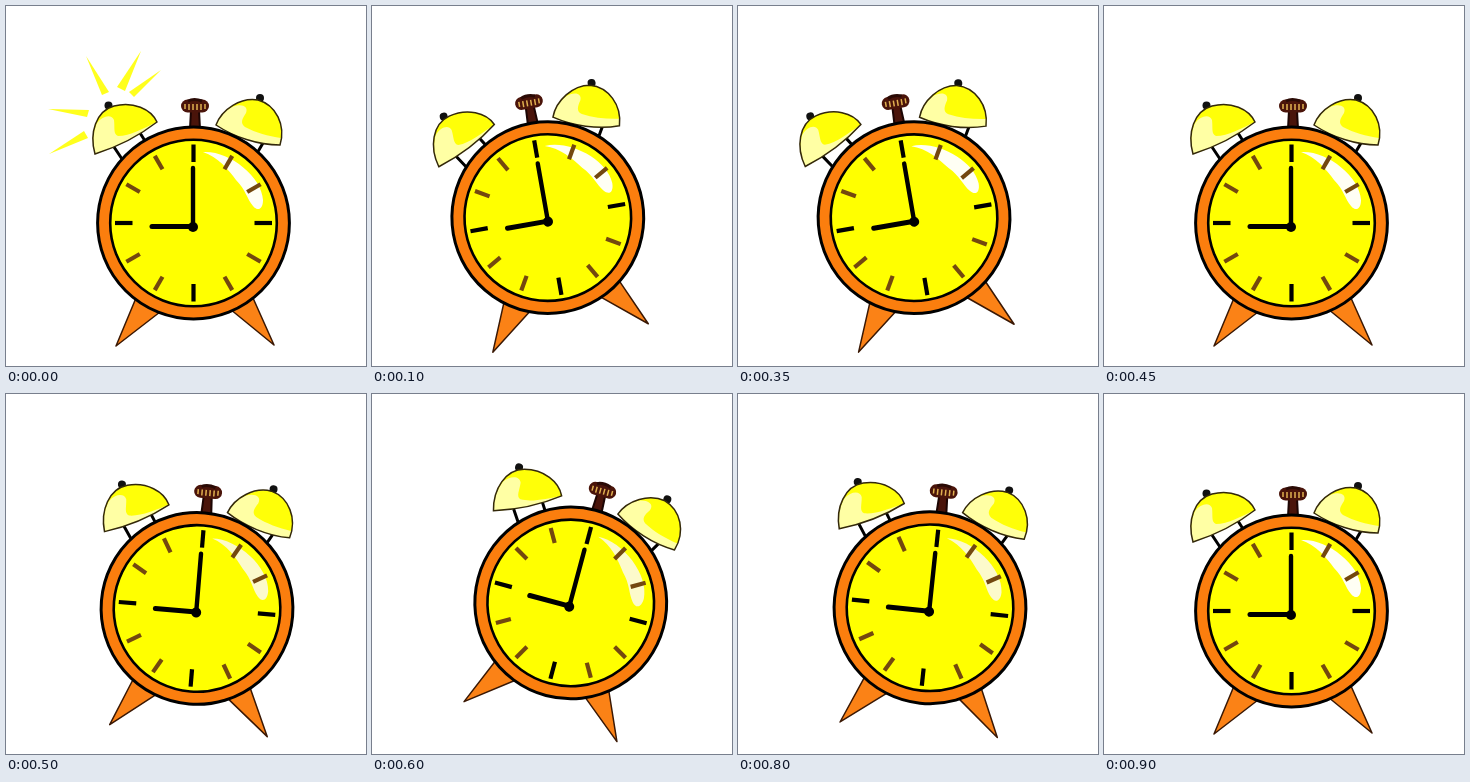
Recreate the animation shown at these times as an HTML page. Size 360 by 360 pixels, loop 950 ms.

```html
<!DOCTYPE html>
<html>
<head>
<meta charset="utf-8">
<title>Alarm clock</title>
<style>
html, body { margin: 0; width: 100%; height: 100%; overflow: hidden; background: #fff; }
/* Laid out at double size and halved in the transform, to stay sharp in perspective */
svg { position: absolute; left: 0; top: 0; width: 720px; height: 720px; overflow: visible; transform-origin: 0 0; }
</style>
</head>
<body>
<svg id="clock" viewBox="0 0 360 360">
  <g id="rays" fill="#ffff1e">
    <path d="M135 45L111 81L119 85Z"/>
    <path d="M80 50L96 89L103 86Z"/>
    <path d="M155 64L123 86L128 91Z"/>
    <path d="M42 103L83 104L81 111Z"/>
    <path d="M43 148L78 125L82 132Z"/>
  </g>
  <g fill="#fb8216" stroke="#3a1804" stroke-width="1.5" stroke-linejoin="round">
    <path d="M110 340L130 292L154 306Z"/>
    <path d="M268 339L247 292L224 303Z"/>
  </g>
  <path d="M108 141L116 153M134 127L141 138M227 125L221 138M257 137L250 149" stroke="#000" stroke-width="3"/>
  <path d="M185 104H193L194 123H184Z" fill="#4a140a" stroke="#1c0503" stroke-width="2"/>
  <rect x="175" y="93.500" width="28" height="13" rx="6.500" fill="#4a140a"/>
  <path d="M182 95Q188 92 196 95" fill="none" stroke="#2a0a05" stroke-width="3"/>
  <path id="grip" d="M179 98V103M183 98V104M187 98V104M191 98V104M195 98V104M199 98V103" stroke="#e0b050" stroke-width="1.500"/>
  <circle cx="102.500" cy="99.500" r="4" fill="#111"/>
  <circle cx="254" cy="92" r="4" fill="#111"/>
  <g fill="#ffff08">
    <path id="bellL" d="M89 148C83 127 90 105 108 100C127 95 145 103 151 116C133 130 111 141 89 148Z"/>
    <path id="bellR" d="M210 119C216 103 235 91 252 94C270 99 280 119 274 139C252 139 228 131 210 119Z"/>
  </g>
  <g fill="#ffffa4">
    <path d="M89 148C86 136 87 126 91 117C97 109 106 108 108 114C109 122 107 128 112 130C124 130 138 122 151 116C133 130 111 141 89 148Z"/>
    <path d="M210 119C214 110 220 104 226 101C235 97 243 100 240 107C236 113 234 117 239 121C250 127 262 130 275 132L274 139C252 139 228 131 210 119Z"/>
  </g>
  <g fill="none" stroke="#33280a" stroke-width="1.500">
    <use href="#bellL"/>
    <use href="#bellR"/>
  </g>
  <circle cx="187.500" cy="217" r="89.700" fill="#ffff00" stroke="#000" stroke-width="15.400"/>
  <circle cx="187.500" cy="217" r="89.500" fill="none" stroke="#fb7e0e" stroke-width="9.800"/>
  <path id="shine" d="M197 146C222 144 256 170 257 194C257 203 252 206 247 200C241 193 240 184 230 174C222 163 212 151 197 146Z"/>
  <g id="ticks"></g>
  <path d="M187 220.500H146" stroke="#000" stroke-width="5" stroke-linecap="round"/>
  <path d="M187 221V162" stroke="#000" stroke-width="4.400" stroke-linecap="round"/>
  <circle cx="187" cy="221" r="5"/>
</svg>
<script>
const STEP = 50, LOOP = 950, CX = 187.5, CY = 217;
const clock = document.getElementById('clock');
const rays = document.getElementById('rays');
const grip = document.getElementById('grip');
const shine = document.getElementById('shine');
const ticks = document.getElementById('ticks');

// Anchors: left foot, right foot, left knob, right knob
const anchors = [[110, 340], [268, 339], [102, 99], [254, 91]];
const leanLeft = [[113, 336], [291, 325], [53, 115], [208, 47]];
const leanFar = [[110, 343], [315, 331], [37, 103], [212, 28]];
const leanRight = [[84, 328], [262, 340], [167, 52], [322, 117]];

// A number is a plain tilt in degrees, a list is a pose in perspective
const poses = [0, -5, -10, -15, leanLeft, leanFar, -15, -9.8, -5, 0,
  4.7, 10, 15, leanRight, 15, 10.5, 6, 2, 0];

for (let i = 0; i < 12; i++) {
  const main = i % 3 === 0;
  const line = document.createElementNS('http://www.w3.org/2000/svg', 'path');
  line.setAttribute('d', main ? 'M187.500 138.500V156' : 'M187.500 139.500V155');
  line.setAttribute('stroke', main ? '#000' : '#73480f');
  line.setAttribute('stroke-width', 4.2);
  line.setAttribute('transform', `rotate(${i * 30} ${CX} ${CY})`);
  ticks.append(line);
}

function tilt(deg) {
  const a = deg * Math.PI / 180, c = Math.cos(a), s = Math.sin(a);
  const x = CX + deg * (deg < 0 ? 1.17 : 0.75), y = CY - Math.abs(deg) * 0.54;
  return `matrix(${c},${s},${-s},${c},${x - c * CX + s * CY},${y - s * CX - c * CY})`;
}

// Gauss-Jordan elimination on an augmented matrix
function solve(m) {
  const n = m.length;
  for (let i = 0; i < n; i++) {
    let p = i;
    for (let r = i; r < n; r++) if (Math.abs(m[r][i]) > Math.abs(m[p][i])) p = r;
    [m[i], m[p]] = [m[p], m[i]];
    m[i] = m[i].map(v => v / m[i][i]);
    for (let r = 0; r < n; r++) {
      if (r === i) continue;
      const k = m[r][i];
      m[r] = m[r].map((v, j) => v - k * m[i][j]);
    }
  }
  return m.map(row => row[n]);
}

function perspective(quad) {
  const rows = [];
  quad.forEach(([u, v], i) => {
    const [x, y] = anchors[i];
    rows.push([x, y, 1, 0, 0, 0, -x * u, -y * u, u], [0, 0, 0, x, y, 1, -x * v, -y * v, v]);
  });
  const [a, b, c, d, e, f, g, h] = solve(rows).map(v => +v.toFixed(8));
  return `matrix3d(${[a, d, 0, g, b, e, 0, h, 0, 0, 1, 0, c, f, 0, 1]})`;
}

const moves = poses.map(p => (Array.isArray(p) ? perspective(p) : tilt(p)) + ' scale(0.5)');

function draw(ms) {
  const i = Math.floor(ms % LOOP / STEP), pose = poses[i];
  clock.style.transform = moves[i];
  rays.style.display = i === 0 ? '' : 'none';
  grip.style.display = Array.isArray(pose) ? 'none' : '';
  shine.setAttribute('fill', pose > 0 ? '#fcfacb' : '#fffff4');
}

let start;
function tick(now) {
  start ??= now;
  draw(now - start);
  requestAnimationFrame(tick);
}
draw(0);
requestAnimationFrame(tick);
</script>
</body>
</html>
```
